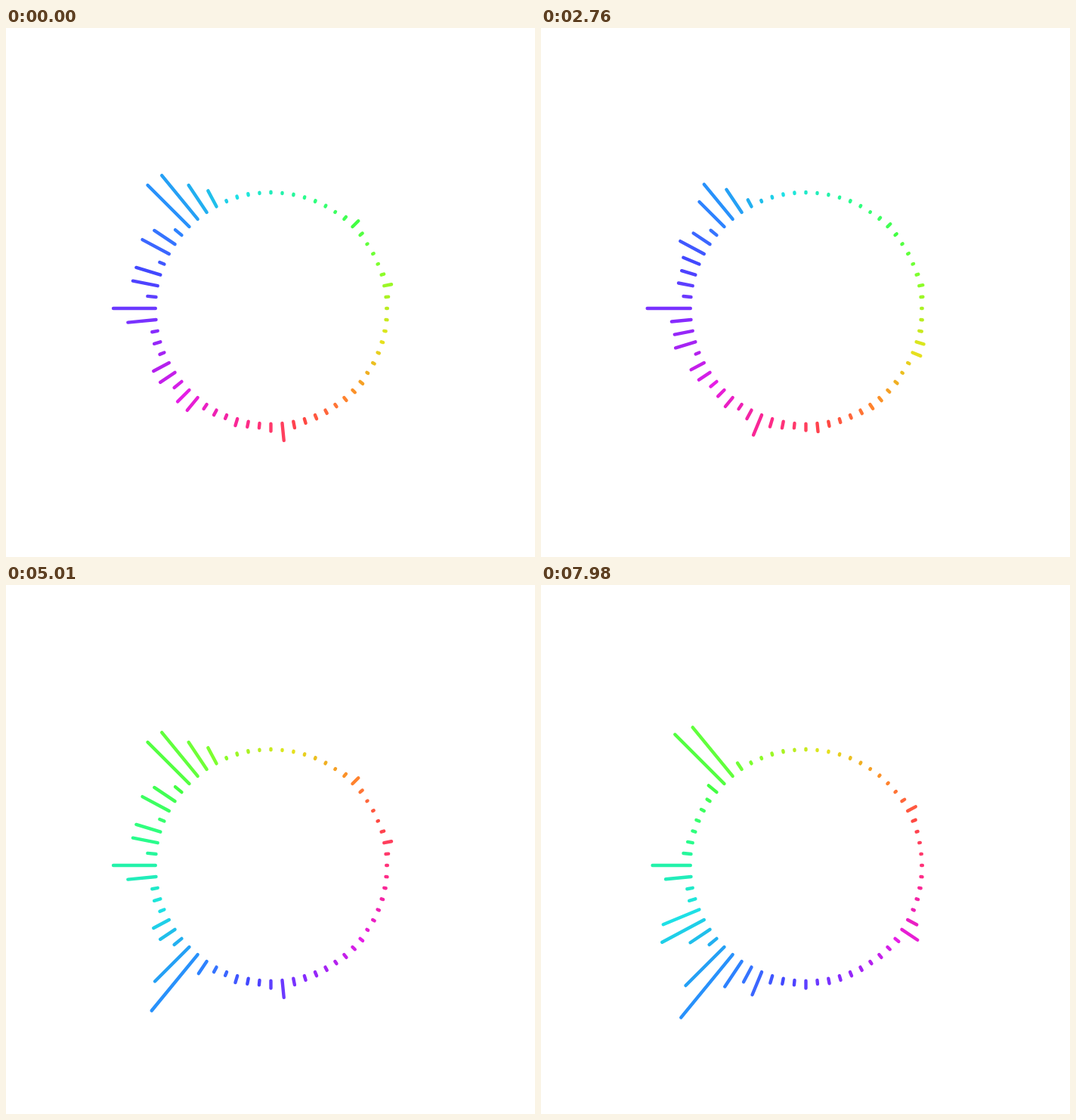
Write an HTML page with a canvas that moves like this. It is 700x700 px and loops after 8000 ms.

```html
<!DOCTYPE html>
<html lang="en">
<head>
<meta charset="utf-8">
<title>Circular spectrum</title>
<style>
  html, body { margin: 0; width: 100%; height: 100%; overflow: hidden; background: #fff; }
  canvas { display: block; width: 100vw; height: 100vh; filter: blur(.7px); }
</style>
</head>
<body>
<canvas id="stage" width="700" height="700"></canvas>
<script>
const LOOP = 8000, STEP = 30, BARS = 64, ATTACK = 90;
const CENTER = { x: 350.5, y: 371 }, RADIUS = 152.7;
const PEAK_HUE = 210;
const ctx = document.getElementById('stage').getContext('2d');

// Partials of each chord: position on the ring (clockwise from the right) and loudness.
const bright = [[15, 23], [23.5, 28], [26.5, 30], [31.7, 61], [34.5, 43], [37.4, 47], [40.48, 98], [42.2, 45], [56, 11], [62, 10]];
const dark = [[3.4, 26], [10, 13], [18, 14], [29.6, 52], [31.7, 44], [36.4, 36], [38, 25], [41, 52]];
const warm = [[3.4, 20], [10.6, 15], [20, 40], [29.6, 50], [34, 27], [37.4, 30], [39.45, 86], [41.3, 38]];
const open = [[5.8, 26], [20.1, 33], [21.8, 42], [27.4, 74], [31.7, 55], [40.45, 113], [59, 12]];

const keys = [
  { at: 0, chord: bright }, { at: 1770, chord: bright }, { at: 3690, chord: dark },
  { at: 5010, chord: bright }, { at: 6150, chord: bright }, { at: 7260, chord: warm },
  { at: 7980, chord: open }
];

// Struck bass notes: sharp rise, exponential fall.
const notes = [
  { pitch: 20.1, at: 2490, peak: 120, fall: 190 }, { pitch: 23.3, at: 3400, peak: 238, fall: 430 },
  { pitch: 26, at: 3430, peak: 242, fall: 600 }, { pitch: 26, at: 4200, peak: 172, fall: 300 },
  { pitch: 23.3, at: 4700, peak: 204, fall: 467 }, { pitch: 26, at: 5400, peak: 172, fall: 250 },
  { pitch: 20.1, at: 6030, peak: 134, fall: 190 }, { pitch: 23.3, at: 6600, peak: 212, fall: 180 },
  { pitch: 26.1, at: 7080, peak: 242, fall: 442 }, { pitch: 23.3, at: 7650, peak: 218, fall: 537 }
];

const mix = (a, b, u) => a + (b - a) * u;
const bell = (i, pitch) => Math.exp(-((i - pitch) ** 2));
const random = seed => {
  const x = Math.sin(seed * 12.9898 + 4.1) * 43758.5453;
  return x - Math.floor(x);
};

// Quiet background, strongest at the lower left and silent at the upper right.
function murmur(i) {
  const swell = (0.5 + 0.5 * Math.cos((i - 23) / BARS * 2 * Math.PI)) ** 2;
  return 1 + 12 * swell * (0.3 + 0.7 * random(i)) + random(i + BARS);
}

function chordLevel(chord, i) {
  return Math.max(murmur(i), ...chord.map(([pitch, loudness]) => loudness * bell(i, pitch)));
}

function noteLevel(note, t) {
  const age = t - note.at;
  return note.peak * (age < 0 ? Math.max(0, 1 + age / ATTACK) : Math.exp(-age / note.fall));
}

function levels(t) {
  let k = 0;
  while (k < keys.length - 2 && t >= keys[k + 1].at) k++;
  const from = keys[k], to = keys[k + 1];
  const u = Math.min(1, (t - from.at) / (to.at - from.at));
  const ease = u * u * (3 - 2 * u);
  const flutter = 0.2 * Math.sin(Math.PI * u);
  return Array.from({ length: BARS }, (_, i) => {
    const chord = mix(chordLevel(from.chord, i), chordLevel(to.chord, i), ease);
    const shake = 1 + flutter * Math.sin(t / (55 + 30 * random(i)) + i * 2.4);
    return Math.max(chord * shake, ...notes.map(note => noteLevel(note, t) * bell(i, note.pitch)));
  });
}

// Yellow, cyan and magenta are toned down against red, green and blue.
function color(hue) {
  const tone = Math.cos(hue * Math.PI / 60);
  return `hsl(${hue}, ${Math.min(100, 96 + 16 * tone)}%, ${57 + 6 * tone}%)`;
}

function draw(t) {
  const bars = levels(t);
  const loudest = bars.indexOf(Math.max(...bars));
  ctx.fillStyle = '#fff';
  ctx.fillRect(0, 0, 700, 700);
  ctx.lineWidth = 4.4;
  ctx.lineCap = 'round';
  bars.forEach((length, i) => {
    const angle = i / BARS * 2 * Math.PI;
    const dx = Math.cos(angle), dy = Math.sin(angle), end = RADIUS + length;
    ctx.strokeStyle = color(PEAK_HUE + (loudest - i) * 360 / BARS);
    ctx.beginPath();
    ctx.moveTo(CENTER.x + dx * RADIUS, CENTER.y + dy * RADIUS);
    ctx.lineTo(CENTER.x + dx * end, CENTER.y + dy * end);
    ctx.stroke();
  });
}

function tick() {
  const t = performance.now() % LOOP;
  draw(Math.floor(t / STEP) * STEP);
  requestAnimationFrame(tick);
}
tick();
</script>
</body>
</html>
```
